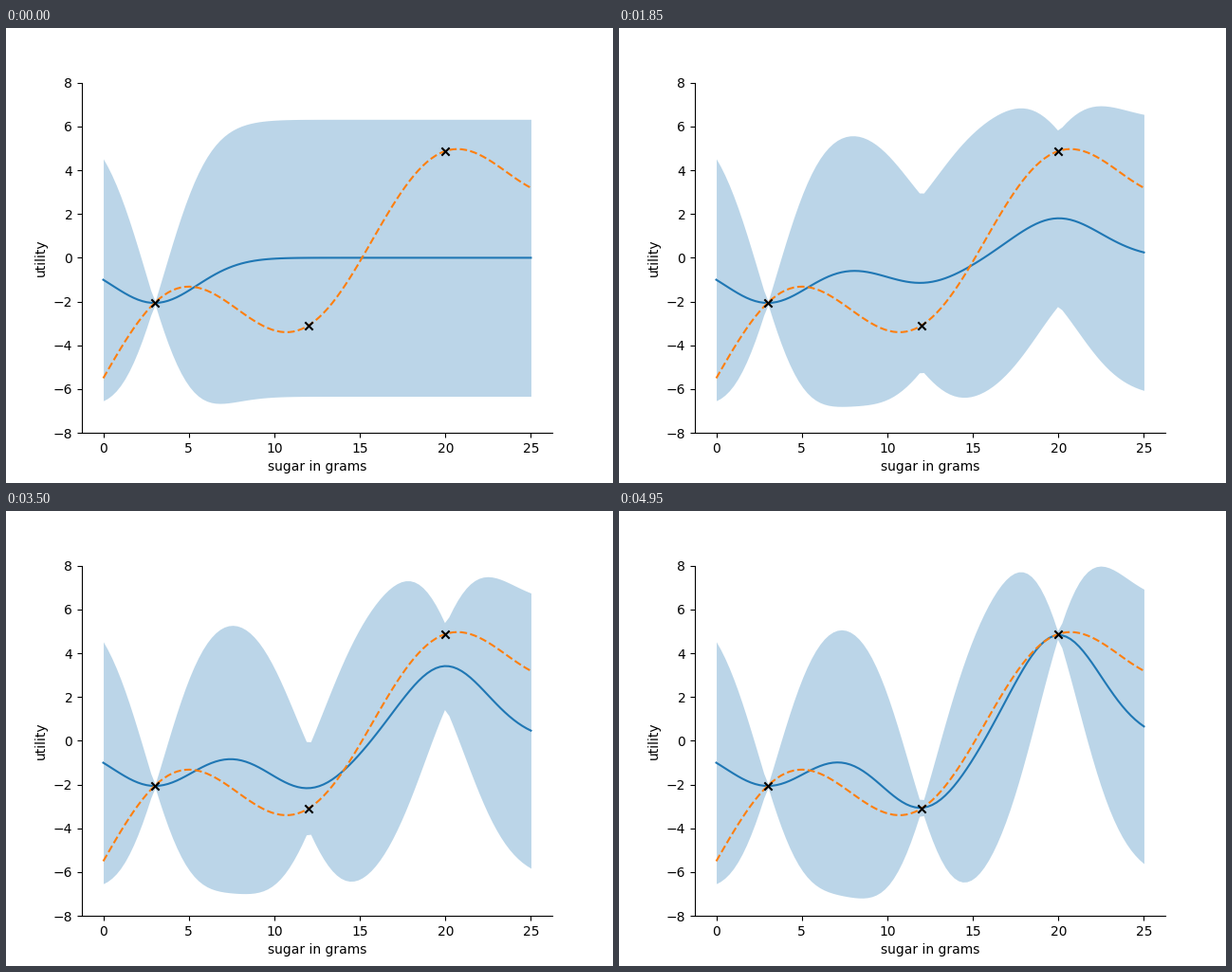
Animation of 640 by 480 pixels, one loop 5000 ms. Source, as a matplotlib script:

```python
import numpy as np
import matplotlib.pyplot as plt
from matplotlib.animation import FuncAnimation

FRAMES, INTERVAL = 100, 50
VARIANCE, LENGTH = 10.0, 2.5


def utility(x):
    z = 0.4 * x
    return z + 2.4 * np.sin(z) - 5.5


def kernel(a, b):
    return VARIANCE * np.exp(-np.subtract.outer(a, b) ** 2 / (2 * LENGTH**2))


def posterior(x, seen):
    """Mean and two-sigma half-width of a noise-free Gaussian process."""
    cross = kernel(x, seen)
    weights = np.linalg.solve(kernel(seen, seen), cross.T).T
    mean = weights @ utility(seen)
    var = VARIANCE - np.sum(weights * cross, axis=1)
    return mean, 2 * np.sqrt(np.maximum(var, 0))


grid = np.linspace(0, 25, 100)
points = np.array([3.0, 12.0, 20.0])
mean_a, half_a = posterior(grid, points[:1])
mean_b, half_b = posterior(grid, points)

plt.rcParams["font.family"] = "DejaVu Sans"
fig, ax = plt.subplots(figsize=(6.4, 4.8), dpi=100)
band = ax.fill_between(grid, mean_a - half_a, mean_a + half_a,
                       color="C0", alpha=0.3, linewidth=0)
mean_line, = ax.plot(grid, mean_a, color="C0")
ax.plot(grid, utility(grid), color="C1", linestyle="--")
ax.scatter(points, utility(points), color="black", marker="x", zorder=3)
ax.set(xlim=(-1.25, 26.25), ylim=(-8, 8),
       xlabel="sugar in grams", ylabel="utility")
ax.spines[["top", "right"]].set_visible(False)


def update(i):
    t = i / FRAMES
    mean = (1 - t) * mean_a + t * mean_b
    half = (1 - t) * half_a + t * half_b
    mean_line.set_ydata(mean)
    outline = np.column_stack([
        np.concatenate([grid, grid[::-1]]),
        np.concatenate([mean - half, (mean + half)[::-1]]),
    ])
    band.set_verts([outline])
    return band, mean_line


anim = FuncAnimation(fig, update, frames=FRAMES, interval=INTERVAL,
                     init_func=lambda: update(0), repeat=True, repeat_delay=0)
plt.show()
```
